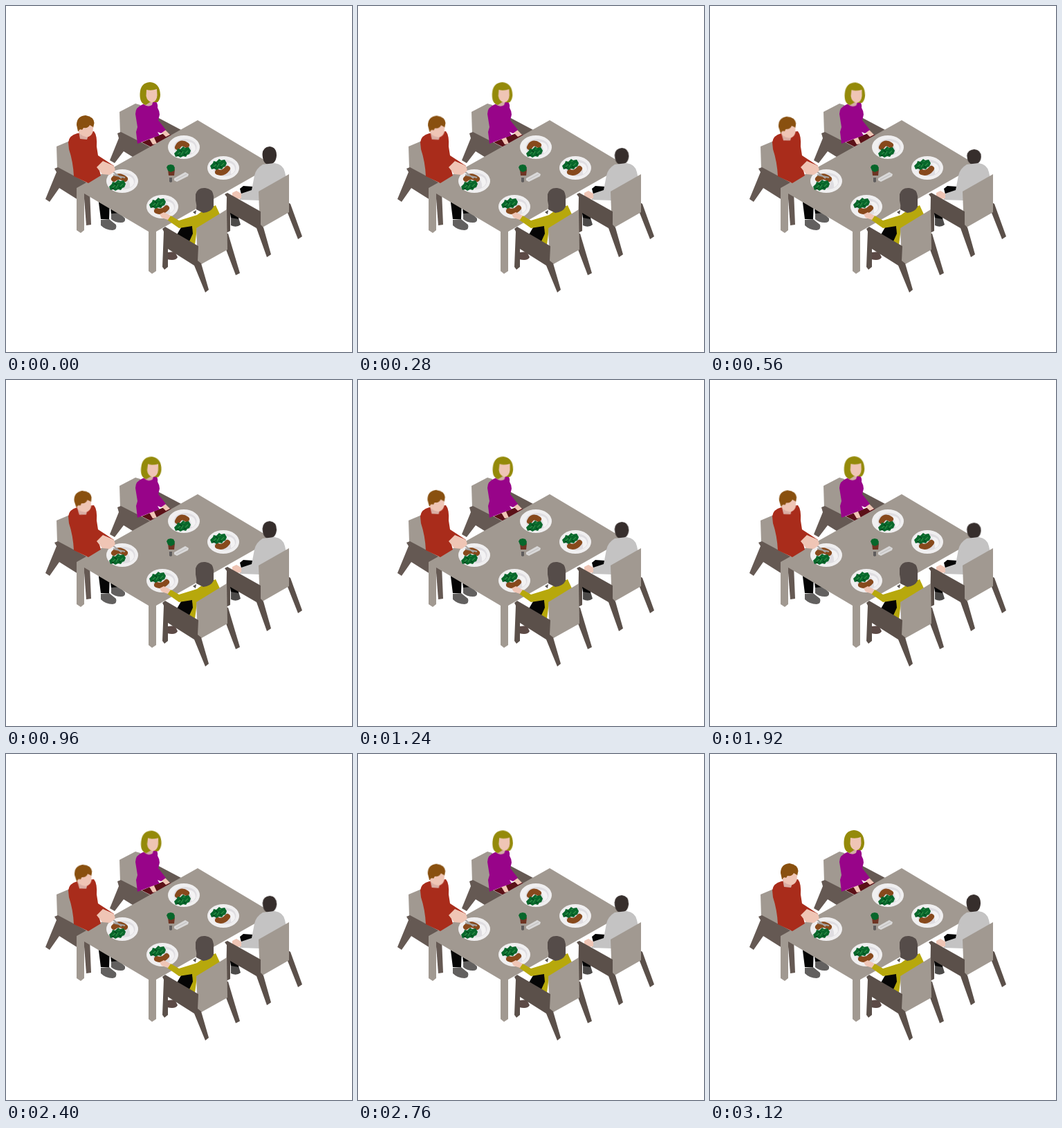
These frames come from a looping animation (500x500 px, 3.16 s). An HTML page:

```html
<!DOCTYPE html>
<html lang="en">
<head>
<meta charset="utf-8">
<title>Dinner for four</title>
<style>
  html, body { margin: 0; width: 100%; height: 100%; overflow: hidden; background: #fff; }
  svg { display: block; width: 100%; height: 100%; }
  .wood { fill: #5b504a; }
  .far { fill: #655953; }
  .grey { fill: #a19991; }
  .skin { fill: #efc5b5; }
  .meat { fill: none; stroke: #87491c; stroke-width: 8; stroke-linecap: round; }
  .leaf { fill: #07672b; }
  .head { animation: 3160ms ease-in-out infinite; }
  #redHead { animation-name: lean; transform-origin: 115px 190px; }
  #purpleHead { animation-name: tilt; transform-origin: 209px 145px; }
  #greyHead { animation-name: nod; transform-origin: 380px 230px; }
  @keyframes lean {
    0%, 100% { transform: none; }
    26% { transform: translate(-1.5px, 2px) rotate(-7deg); }
    47.5% { transform: translate(-.2px, .4px) rotate(-1.2deg); }
    71% { transform: translate(-1.2px, 1.8px) rotate(-6deg); }
  }
  @keyframes tilt {
    0%, 100% { transform: none; }
    28.5% { transform: translate(.4px, .8px) rotate(4deg); }
    57% { transform: translate(0, .2px) rotate(.6deg); }
    76% { transform: translate(.4px, .8px) rotate(4deg); }
  }
  @keyframes nod {
    0%, 100% { transform: none; }
    17.7% { transform: translateX(.8px) scaleY(.85); }
    31.6% { transform: translateX(.1px) scaleY(.97); }
    49.4% { transform: translateX(.8px) scaleY(.85); }
    76% { transform: translateX(.3px) scaleY(.93); }
  }
</style>
</head>
<body>
<svg viewBox="0 0 500 500">
  <defs>
    <g id="plate">
      <ellipse rx="23" ry="17" fill="#f0eff0"/>
      <ellipse cx="2" rx="16.500" ry="12" fill="#dfdde1"/>
      <path d="M3-8Q17-8 17 3Q15 8 11 9Q12-2 3-8Z" fill="#f3f2f3"/>
    </g>
    <g id="salad">
      <path class="leaf" d="M-12 2L-8-2L-7-5L-3-4L1-8L4-6L9-7L12-2L10 3L7 4L5 7L1 6L-3 8L-6 6L-10 7Z"/>
      <path d="M-7 3l4-3M-2 4l3-5M4 2l4-4M1-4l3-1" stroke="#2f8b45" stroke-width="1.3"/>
      <path d="M-4-2l3 2M2 3l3 1M-8 5l3 0" stroke="#04421c" stroke-width="1.3"/>
    </g>
  </defs>

  <!-- purple guest -->
  <path class="far" d="M219 161L253 179L240 188L222 178Z"/>
  <path class="grey" d="M164 153L187 141L194 143L192 199L165 185Z"/>
  <path class="far" d="M161 184L166 182L217 208L191 223L170 210L157 227L150 223L163 191Z"/>
  <path d="M196 197L228 184L241 187L212 205Z" fill="#5b1118"/>
  <path class="skin" d="M206 190L213 188L218 199L212 200ZM222 180L229 178L237 186L231 189Z"/>
  <path d="M187 156Q187 146 198 142L215 137Q220 140 219 147Q222 152 222 157L220 165L231 179L224 184L219 182L222 187L208 192L190 199L188 182L190 175Z" fill="#980489"/>
  <g id="purpleHead" class="head">
    <path d="M198 138L213 136L211 143Q205 147 199 142Z" fill="#d3adA5"/>
    <path d="M193.500 127Q194 111 208 110Q222 111 223 128Q223 135 219 139L208 139L202 143Q193 141 193.500 127Z" fill="#948a0a"/>
    <path class="skin" d="M203 121Q210 123 218 120L218.500 129Q218 138 211 139.500Q204 138 202.500 130Z"/>
  </g>

  <!-- red guest -->
  <path class="grey" d="M73 203L92 195L101 247L74 234Z"/>
  <path class="far" d="M70 235L75 233L122 258L115 266L104 280L77 263L63 283L57 279L73 240Z"/>
  <path class="far" d="M112 265L121 268L123 316L116 317Z"/>
  <path d="M133 276L150 282L149 308L137 308ZM150 284L162 291L163 300L152 300Z" fill="#050505"/>
  <path d="M137 309L149 308L159 316Q161 323 154 324Q144 324 137 317ZM152 300L164 299L172 307Q173 313 166 313Q157 313 152 308Z" fill="#62605f"/>

  <!-- table -->
  <path class="grey" d="M277 165L386 230L217 326V383L211 387L206 383V326L113 271V324L108 328L102 324V263Z"/>

  <!-- place settings -->
  <use href="#plate" x="168" y="253"/>
  <use href="#plate" x="257" y="204"/>
  <use href="#plate" x="314" y="234"/>
  <use href="#plate" x="226" y="290"/>
  <path class="meat" d="M156 250Q163 243 172 250"/>
  <path class="meat" d="M248 204Q252 195 261 201"/>
  <path class="meat" d="M306 240Q314 243 320 235"/>
  <path class="meat" d="M218 296Q226 299 232 292"/>
  <use href="#salad" x="161" y="259"/>
  <use href="#salad" x="255" y="211"/>
  <use href="#salad" x="307" y="229"/>
  <use href="#salad" x="219" y="285"/>
  <path d="M154 239L167 249M155 244L172 248" stroke="#a5a3a2" stroke-width="2"/>

  <!-- centrepiece -->
  <path d="M234 236H244L243 245H235Z" fill="#6e3423"/>
  <path class="leaf" d="M232 233L234 230L238 229L242 230L244 234L243 238L238 240L234 238Z"/>
  <path d="M236 248H240V254L238 255L236 254Z" fill="#5f5c5d"/>
  <path d="M243 249L259 240L264 243L263 246L247 254L243 252Z" fill="#d9d8d8"/>
  <path d="M246 251L261 243" stroke="#bebcbc"/>

  <!-- red guest, upper body -->
  <path d="M90 197Q91 187 103 184L117 182L127 181Q132 187 131 203L133 216L156 231L151 236L134 234L137 245L119 256L98 246Q97 225 91 207Z" fill="#a92c1b"/>
  <path class="skin" d="M131 233L140 224L154 230Q159 234 157 239L150 244L139 243Z"/>
  <g id="redHead" class="head">
    <path d="M105 181L120 184L117 193L107 192Z" fill="#d9aea4"/>
    <path d="M102 172Q102 159 115 158Q127 160 127.500 169L126 176L113 181L104 181Z" fill="#89500f"/>
    <path class="skin" d="M105 180Q107 177 110 179L112 176Q119 177 121 172L126 175L125.500 182Q123 189 117 189.500Q110 188 106 184Z"/>
  </g>

  <!-- grey guest -->
  <path d="M325 302L336 306L339 316Q333 321 325 317Z" fill="#4c4a49"/>
  <path d="M323 294L336 298V308L325 306ZM338 264L343 260L357 261V271L340 272Z" fill="#050505"/>
  <g id="greyHead" class="head">
    <path d="M370.500 214Q371 204 381 203Q391 204 391 216Q390 229 379 229Q371 228 370.500 214Z" fill="#362e2c"/>
  </g>
  <path d="M359 245Q361 235 371 229L388 227Q401 229 403 240L406 254L367 281L338 280L337 272L355 266Z" fill="#c4c3c3"/>
  <path class="skin" d="M327 270L333 267L340 271V278L332 279L327 275Z"/>
  <path class="wood" d="M408 284L411 286L428 333L422 337L407 299Z"/>
  <path class="grey" d="M409 243V298L367 322L365 268Z"/>
  <path class="wood" d="M316 272L320 270L368 297V316L372 320L383 359L377 363L362 321L324 299V325L318 328L319 276Z"/>

  <!-- yellow guest -->
  <path d="M233 356L244 355L248 363Q245 369 233 366Z" fill="#5c4a46"/>
  <path d="M246 332L253 320L269 316L272 336L266 345Z" fill="#050505"/>
  <path d="M270 298L275 295L274 301Z" fill="#575250"/>
  <path d="M238 303L250 310L276 302L284 296L303 288L309 301L276 322L273 345L265 340L270 329L269 318L250 321L233 309Z" fill="#b7a80c"/>
  <path class="skin" d="M222 301L228 298L238 303L234 309L225 306Z"/>
  <path d="M274 272Q277 262 288 263Q299 264 300 275L300 290Q296 298 285 299L275 294Q276 288 274 281Z" fill="#554c49"/>
  <path class="wood" d="M318 328L321 329L338 386L332 389L318 352Z"/>
  <path class="grey" d="M319 294L320 352L277 376L275 321Z"/>
  <path class="wood" d="M226 322L230 319L278 347L277 368L282 372L293 410L288 414L272 375L234 351V377L229 381L226 377L228 326Z"/>
</svg>
</body>
</html>
```
